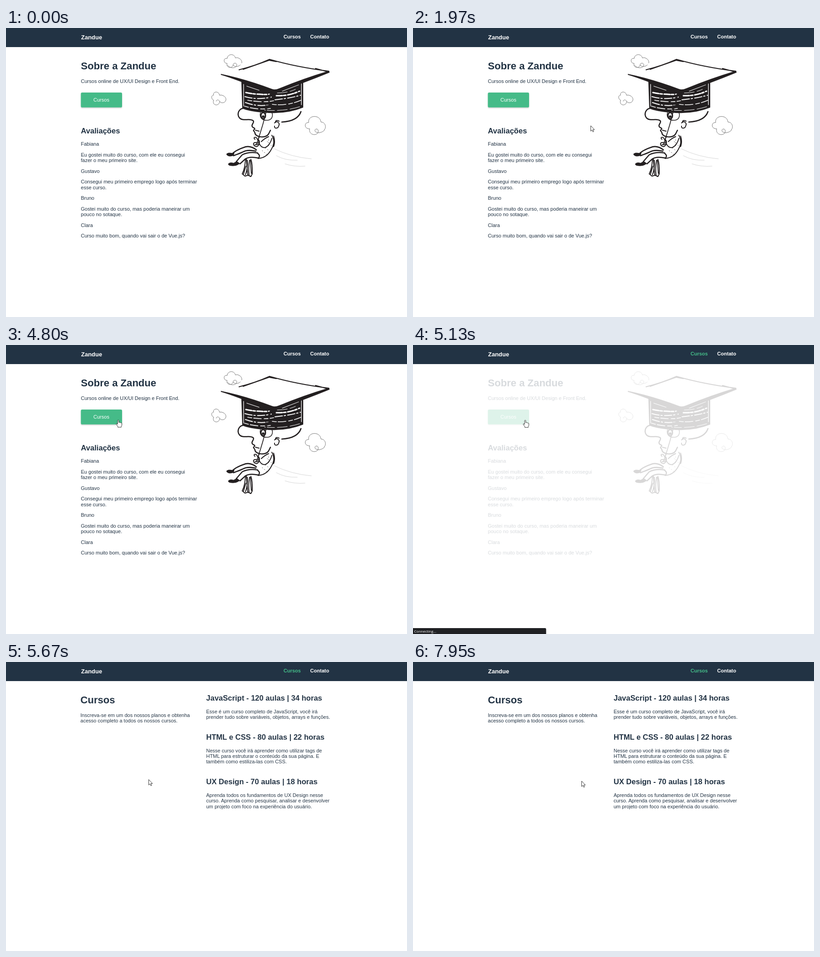
Recreate the animation shown at these times as an HTML page. Size 881 px wide and 636 px high, loop 8000 ms.

```html
<!DOCTYPE html>
<html lang="pt-BR">
<head>
<meta charset="utf-8">
<title>Cursos</title>
<style>
  html, body { margin: 0; width: 100%; height: 100%; overflow: hidden; background: #fff; }
  svg { display: block; width: 881px; height: 636px; }
  text { font: 11.04px "Liberation Sans", Arial, sans-serif; fill: #234; white-space: pre; }
  .h1 { font-size: 22.08px; font-weight: bold; }
  .h2 { font-size: 16.56px; font-weight: bold; }
  .nav { font-weight: bold; fill: #fff; }
  .brand { font-size: 13px; font-weight: bold; fill: #fff; }
  .label { fill: #fff; }
  #status text { font: 8px "Open Sans", sans-serif; fill: #fff; }
  .ink { fill: none; stroke: #231f20; stroke-width: 2; stroke-linecap: round; stroke-linejoin: round; }
  .solid { fill: #231f20; stroke: none; }
  .chalk { fill: none; stroke: #fff; stroke-linecap: round; }
  .cloud { fill: none; stroke: #777; stroke-width: 1; stroke-linecap: round; }
  .wind { fill: none; stroke: #ccc; stroke-width: .8; stroke-linecap: round; }
  #cursor path { fill: #fff; stroke: #222; stroke-width: .9; stroke-linejoin: round; }
</style>
</head>
<body>
<svg viewBox="0 0 881 636">
  <defs>
    <filter id="shadow" x="-10%" y="-10%" width="120%" height="140%">
      <feDropShadow dx="0" dy="1.6" stdDeviation="1.2" flood-opacity=".2"/>
    </filter>
  </defs>
  <rect width="881" height="42" fill="#234"/>
  <g id="header"></g>

  <g id="home">
    <rect x="164.5" y="142" width="90.5" height="32.7" rx="2.8" fill="#4b8" filter="url(#shadow)"/>
    <g id="art">
      <g class="cloud">
        <path d="M499 82C496 91 482 86 486 78C477 78 477 65 486 67C487 56 502 56 504 66C511 63 520 71 518 77M487 82C491 89 505 90 507 82C508 76 499 76 499 81C500 86 511 86 515 81"/>
        <path d="M456 159C449 155 452 147 456 148C454 139 468 138 469 148C477 146 485 153 483 159C481 166 472 166 470 162M456 159C452 170 466 173 469 164C471 158 462 156 462 161"/>
        <path d="M667 222C654 222 655 207 665 208C662 192 690 189 692 207C703 207 704 221 699 224M667 222C664 236 684 239 686 228C687 220 677 221 679 227C682 233 696 231 700 224"/>
      </g>
      <g class="wind">
        <path d="M563 112Q584 101 607 108M577 105Q597 101 620 107M638 91Q648 100 663 100"/>
        <path d="M590 266Q626 284 671 288M594 281Q613 292 640 291M613 299Q634 306 657 304"/>
      </g>

      <!-- mortarboard -->
      <path class="solid" d="M517 116L590 137 653 114 653 175Q614 191 566 186 535 184 519 177Z"/>
      <g class="chalk">
        <path stroke-width="1.3" d="M522 124V172M649 121V169M529 128l27 9M607 139l36-14"/>
        <path stroke-width="3" stroke-dasharray="13 3 5 4" d="M527 142Q548 147 579 146M594 149Q621 150 645 139"/>
        <path stroke-width="2" stroke-dasharray="16 4 3 5" d="M525 151Q552 159 583 152M591 158Q622 155 647 148M526 164Q554 174 577 169"/>
        <path stroke-width="1.6" stroke-dasharray="9 4 17 6" d="M524 172Q552 181 581 177M585 168Q618 172 648 159M531 159Q566 165 588 160"/>
        <path stroke-width="1" stroke-dasharray="22 6" d="M568 181Q614 184 649 172M596 143Q619 143 636 135"/>
      </g>
      <path d="M473 102L513 92 579 69 709 96 590 136Z" fill="#fff"/>
      <path class="solid" d="M472 101Q525 112 584 134Q591 137 600 133Q653 111 710 94L711 98Q655 121 592 143Q574 141 523 121Q495 110 472 103Z"/>
      <path class="ink" stroke-width="2.4" d="M512 92Q548 83 579 69Q638 86 709 95M521 91L578 71 594 74M680 89L709 97"/>

      <!-- head -->
      <g class="ink">
        <path style="stroke-width:2.5" d="M528 177C511 174 506 190 513 198C521 206 535 198 543 204C547 208 538 212 541 217C543 221 548 219 546 223C540 226 548 228 547 232C550 241 571 243 577 233L581 225"/>
        <path d="M590 209C594 203 603 208 599 216C597 222 589 222 590 216M592 208Q592 201 600 205"/>
        <path style="stroke-width:2.6" d="M648 184Q641 205 606 207"/>
        <path style="stroke-width:1.5" d="M559 186C556 198 564 204 575 203C586 202 588 190 582 183"/>
        <ellipse cx="565" cy="193" rx="5" ry="7" style="stroke-width:3"/>
        <path style="stroke-width:1.7" d="M582 139Q581 158 575 170Q566 211 550 257"/>
        <path d="M575 148Q583 149 581 139M577 171Q570 181 571 186M548 225l8 2"/>
      </g>
      <circle class="solid" cx="565" cy="195" r="2.8"/>

      <!-- body, legs and tassel -->
      <g class="ink">
        <path d="M557 239Q553 244 555 251Q560 265 570 263Q580 258 584 243M584 236Q593 251 583 267Q573 286 554 287M588 238Q592 250 588 261"/>
        <path d="M547 245C541 240 551 238 552 245C560 247 557 258 551 261C544 261 541 253 547 252M547 252l7 1M547 257l7-1M561 250Q568 243 577 239"/>
        <path style="stroke-width:2.6" d="M550 268Q535 257 522 263Q507 268 499 275M549 271Q530 267 520 273Q511 277 500 281"/>
        <path style="stroke-width:2.5" d="M553 275Q533 272 519 279L506 294M554 286Q535 282 526 288L514 299M553 276Q560 281 554 287"/>
        <path d="M526 290Q525 309 519 321L525 326 532 324 538 327 541 321Q542 300 538 289M530 291Q532 308 526 323M535 291Q532 309 534 324M537 291L539 320M528 288L531 323M527 304L522 321"/>
        <path style="stroke-width:1;stroke-dasharray:1 5" d="M574 250l9 9M570 264l9 7M563 270l10 8M577 246v18"/>
      </g>
      <path class="solid" d="M484 278Q486 273 496 275L502 275 500 281Q488 285 484 278ZM488 299Q492 294 500 297L507 293 514 298Q505 306 492 303Q488 302 488 299Z"/>
    </g>
  </g>

  <g id="courses"></g>

  <g id="status">
    <path d="M0 623H290Q292.500 623 292.500 626V636H0Z" fill="#202124"/>
    <text x="2.500" y="633">Connecting...</text>
  </g>
  <g id="cursor">
    <path id="arrow" d="M0 0V12L2.800 9.500 4.700 13.700 6.500 12.900 4.800 8.800H8.300Z"/>
    <path id="hand" d="M-1.300 1.300Q0 -.4 1.300 1.300V6Q3 4.800 3.800 6.400 5.400 5.400 6 7 7.600 6.400 8 8.200V11.500Q7.800 13.500 6.700 14.600V16.500H-.8V14.800L-4.300 9.800Q-4.400 7.800 -2.600 8.500L-1.300 10Z"/>
  </g>
</svg>
<script>
const $ = id => document.getElementById(id);

function write(group, x, lines) {
  for (const [y, content, style = ""] of lines) {
    const el = document.createElementNS("http://www.w3.org/2000/svg", "text");
    el.setAttribute("x", x);
    el.setAttribute("y", y);
    el.setAttribute("class", style);
    el.textContent = content;
    $(group).append(el);
  }
}

write("header", 165, [[25, "Zandue", "brand"]]);
write("header", 609.7, [[23, "Cursos", "nav"]]);
write("header", 668.3, [[23, "Contato", "nav"]]);
const activeLink = $("header").children[1];

write("home", 192, [[162, "Cursos", "label"]]);
write("home", 164.5, [
  [91, "Sobre a Zandue", "h1"],
  [121, "Cursos online de UX/UI Design e Front End."],
  [232, "Avaliações", "h2"],
  [259, "Fabiana"],
  [283, "Eu gostei muito do curso, com ele eu consegui"],
  [295, "fazer o meu primeiro site."],
  [319, "Gustavo"],
  [342, "Consegui meu primeiro emprego logo após terminar"],
  [355, "esse curso."],
  [378, "Bruno"],
  [402, "Gostei muito do curso, mas poderia maneirar um"],
  [414, "pouco no sotaque."],
  [438, "Clara"],
  [461, "Curso muito bom, quando vai sair o de Vue.js?"]
]);
write("courses", 164.5, [
  [91, "Cursos", "h1"],
  [121, "Inscreva-se em um dos nossos planos e obtenha"],
  [133, "acesso completo a todos os nossos cursos."]
]);
write("courses", 440.7, [
  [85, "JavaScript - 120 aulas | 34 horas", "h2"],
  [113, "Esse é um curso completo de JavaScript, você irá"],
  [125, "prender tudo sobre variáveis, objetos, arrays e funções."],
  [171, "HTML e CSS - 80 aulas | 22 horas", "h2"],
  [199, "Nesse curso você irá aprender como utilizar tags de"],
  [211, "HTML para estruturar o conteúdo da sua página. E"],
  [223, "também como estiliza-las com CSS."],
  [269, "UX Design - 70 aulas | 18 horas", "h2"],
  [297, "Aprenda todos os fundamentos de UX Design nesse"],
  [309, "curso. Aprenda como pesquisar, analisar e desenvolver"],
  [322, "um projeto com foco na experiência do usuário."]
]);

// Pointer stops: time, x, y
const stops = [
  [190, 781, 606], [950, 484, 406], [1190, 435.5, 340], [1500, 404, 264],
  [1830, 390.5, 218], [1970, 390.5, 215], [2700, 390.5, 215], [2990, 365.5, 201],
  [3080, 365.5, 201], [3310, 361.5, 194.5], [3940, 332.5, 174], [4800, 246.5, 164.5],
  [5230, 246.5, 165], [5510, 296.5, 209.5], [5670, 313.5, 258.5], [5820, 318.5, 288],
  [6450, 318.5, 288], [7320, 342.5, 285], [7950, 370.5, 262]
];
const clamp = v => Math.max(0, Math.min(1, v));
const ramp = (t, start, length) => clamp((t - start) / length);
const ease = p => 1 - (1 - p) ** 2.32;

function pointerAt(t) {
  const next = stops.findIndex(s => s[0] > t);
  if (next < 0) return stops[stops.length - 1].slice(1);
  if (next === 0) return [781, 606];
  const [t0, x0, y0] = stops[next - 1], [t1, x1, y1] = stops[next];
  const p = (t - t0) / (t1 - t0);
  return [x0 + (x1 - x0) * p, y0 + (y1 - y0) * p];
}

function draw(now) {
  const t = now % 8000;
  const entered = ease(ramp(t, 5260, 500));
  $("home").style.opacity = t < 5290 ? 1 - ease(ramp(Math.min(t, 5130), 4970, 300)) : 0;
  $("courses").style.opacity = t < 5290 ? 0 : entered;
  $("courses").setAttribute("transform", `translate(${-52 * (1 - entered)})`);
  activeLink.style.fill = t < 4970 ? "#fff" : "#4b8";
  $("status").style.opacity = ramp(t, 4890, 100) * (1 - ramp(t, 5430, 140));

  const [x, y] = pointerAt(t);
  const overButton = t < 5230 && x < 255 && y < 175;
  $("cursor").setAttribute("transform", `translate(${x} ${y})`);
  $("cursor").style.display = t < 190 ? "none" : "";
  $("arrow").style.display = overButton ? "none" : "";
  $("hand").style.display = overButton ? "" : "none";
  requestAnimationFrame(draw);
}
draw(performance.now());
</script>
</body>
</html>
```
